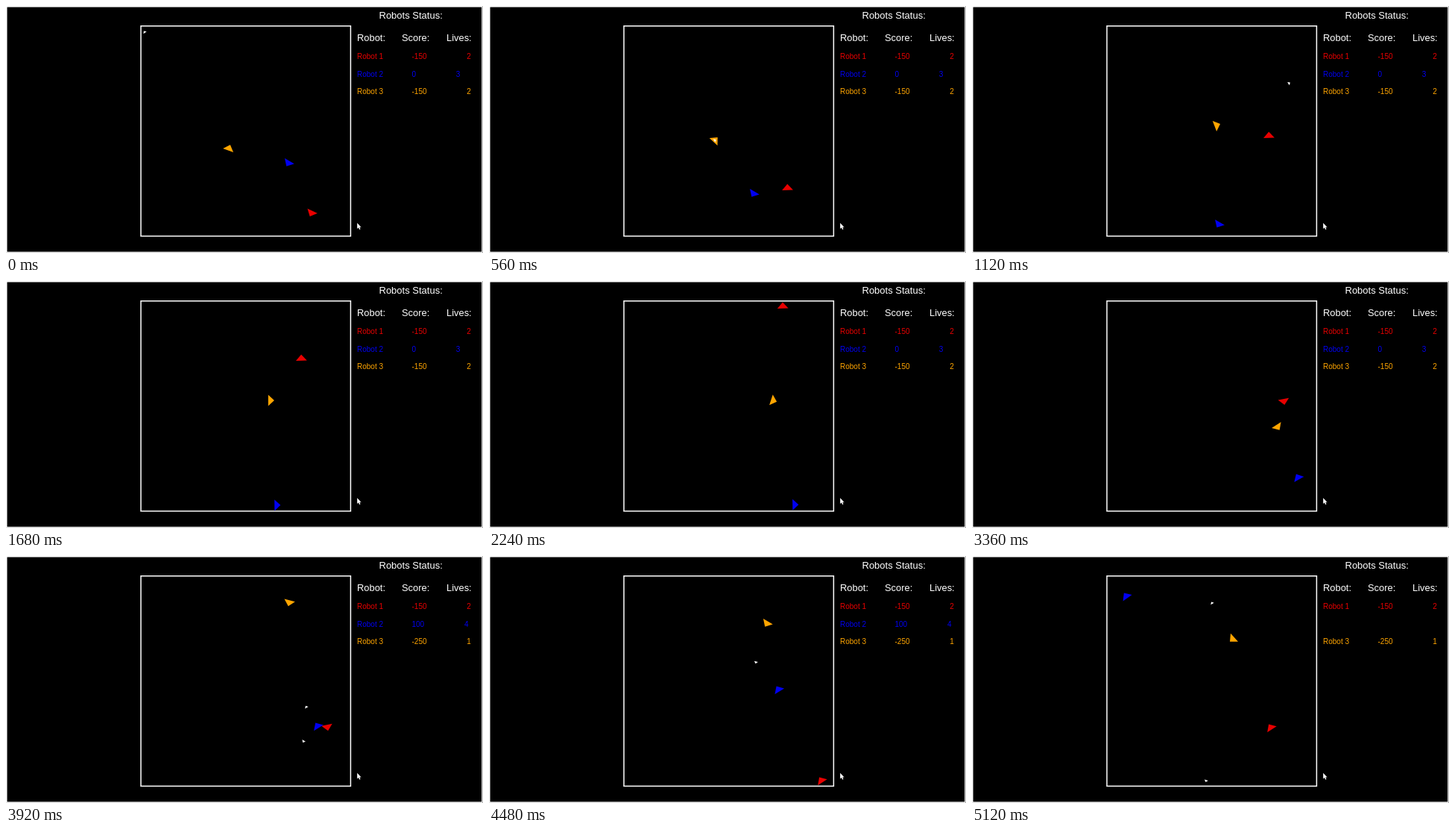
Animation, 640 px wide and 331 px high, one loop 5.2 s. Source, as an HTML page with a canvas:

```html
<!DOCTYPE html>
<html lang="en">
<head>
<meta charset="utf-8">
<title>Robot arena</title>
<style>
  html, body { margin: 0; height: 100%; overflow: hidden; background: #000; }
  canvas { display: block; }
</style>
</head>
<body>
<canvas id="stage" width="640" height="331"></canvas>
<script>
const ctx = document.getElementById('stage').getContext('2d');
const STEP = 80, STEPS = 65;
const HIT = 45, RESPAWN = 64;
const SHOT_SPEED = 20.6;
const rad = degrees => degrees * Math.PI / 180;

// A life is a route of [step, x, y] corners; the robot faces the way it travels.
// "turn" is how many steps it takes to swing round a corner.
const red = { color: '#e80000', turn: 0, lives: [
  [[0, 410, 277], [2, 402, 294], [28.5, 394, 29], [49, 431, 229], [56, 446, 301], [64, 401, 230]]
] };
const blue = { color: '#0000f0', turn: 0, lives: [
  [[0, 379, 210], [15.5, 326, 301], [35, 457, 299], [49, 418, 228], [63.9, 355, 124]],
  [[RESPAWN, 207, 54], [65, 202, 47]]
] };
const orange = { color: '#ffa500', turn: 6, lives: [
  [[0, 299, 191], [7, 303, 180], [14, 328, 160], [28, 381, 160], [36, 397, 175], [44, 414, 202]],
  [[HIT, 384, 46], [56, 373, 90], [64, 350, 111]]
] };
const robots = [red, blue, orange];

function along(route, step) {
  const next = route.findIndex(corner => corner[0] > step);
  const i = next < 0 ? route.length - 1 : Math.max(1, next);
  const [t0, x0, y0] = route[i - 1], [t1, x1, y1] = route[i];
  const k = (step - t0) / (t1 - t0);
  return [x0 + (x1 - x0) * k, y0 + (y1 - y0) * k];
}

function pose({ lives, turn }, step) {
  const route = lives.findLast(life => life[0][0] <= step);
  const [ax, ay] = along(route, step - turn);
  const [bx, by] = along(route, step + turn + 0.1);
  return [...along(route, step), Math.atan2(by - ay, bx - ax)];
}

function shoot(robot, start, degrees, end = STEPS) {
  const [x, y] = pose(robot, start);
  return { x, y, start, end, heading: rad(degrees) };
}

const shots = [
  { x: 186, y: 35, start: 0, end: STEPS, heading: rad(-126) },
  shoot(orange, 7, -32),
  shoot(orange, 33, 58),
  shoot(red, 46.5, 122),
  shoot(blue, 47, -120, 53),
  shoot(orange, 52.7, 105.5),
  shoot(blue, 58.5, -119.5)
];

function triangle(x, y, heading, color, scale = 1) {
  ctx.save();
  ctx.translate(x, y);
  ctx.rotate(heading);
  ctx.scale(scale, scale);
  ctx.beginPath();
  ctx.moveTo(5.4, 0);
  ctx.lineTo(-2.7, 7.4);
  ctx.lineTo(-2.7, -7.4);
  ctx.fillStyle = color;
  ctx.fill();
  ctx.restore();
}

function text(string, x, y, size, color = '#fff') {
  ctx.font = `${size}px "Liberation Sans", Arial, sans-serif`;
  ctx.fillStyle = color;
  ctx.fillText(string, x, y);
  return x + ctx.measureText(string).width;
}

function drawStatus(step) {
  const hit = step >= HIT;
  const scores = ['-150', hit ? '100' : '0', hit ? '-250' : '-150'];
  const lives = ['2', hit ? '4' : '3', hit ? '1' : '2'];
  text('Robots Status:', 500.5, 17, 13);
  ['Robot:', 'Score:', 'Lives:'].forEach((label, i) => text(label, 471 + 60 * i, 47, 12.9));
  robots.forEach(({ color }, i) => {
    if (robots[i] === blue && step >= RESPAWN) return;
    const y = 71 + 23.6 * i;
    text(`Robot ${i + 1}`, 471, y, 10, color);
    const scoreEnd = text(scores[i], 544.5, y, 10, color);
    text(lives[i], scoreEnd + 53.7, y, 10, color);
  });
}

function drawShot({ x, y, start, end, heading }, step) {
  if (step < start || step > end) return;
  const distance = (step - start) * SHOT_SPEED;
  x += distance * Math.cos(heading);
  y += distance * Math.sin(heading);
  if (x > 181 && x < 468 && y > 26 && y < 308) triangle(x, y, heading, '#fff', 0.35);
}

function frame(x, y, width, height) {
  ctx.strokeStyle = '#fff';
  ctx.lineWidth = 1.5;
  ctx.strokeRect(x, y, width, height);
}

function drawPointer() {
  ctx.fillStyle = '#fff';
  ctx.fill(new Path2D('M471.2 290.8v7.8l1.8-1.6 1.3 2.7 1.2-.6-1.2-2.6h2.3z'));
}

function draw(now) {
  const step = Math.floor(now / STEP) % STEPS;
  ctx.fillStyle = '#000';
  ctx.fillRect(0, 0, 640, 331);
  frame(0.75, 0.75, 638.2, 329.4);
  frame(181, 26.8, 281.4, 281.6);
  drawStatus(step);
  for (const robot of robots) triangle(...pose(robot, step), robot.color);
  for (const shot of shots) drawShot(shot, step);
  drawPointer();
  requestAnimationFrame(draw);
}
requestAnimationFrame(draw);
</script>
</body>
</html>
```
